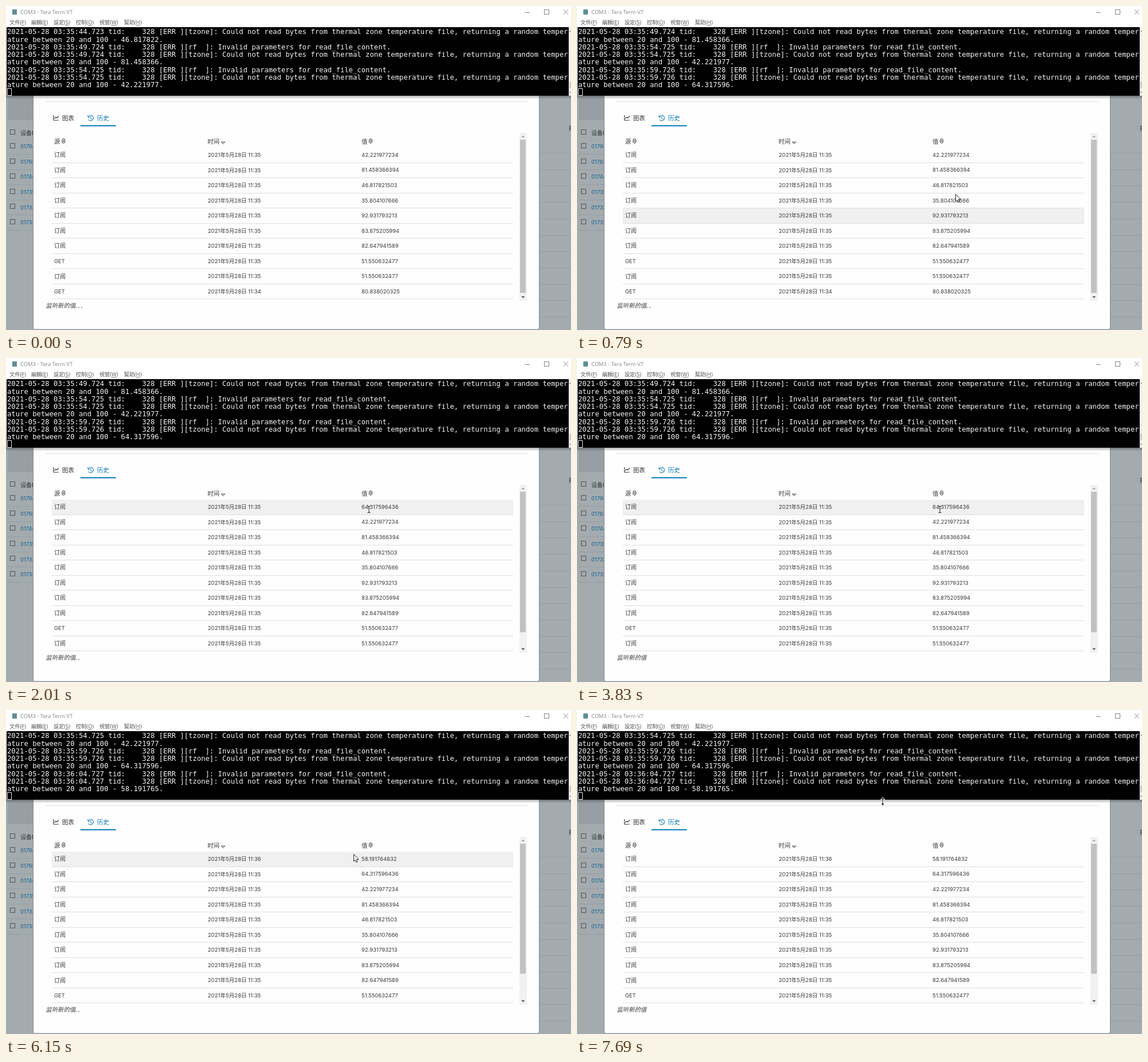
An HTML page with a canvas that plays this animation: 987x567 px, repeating every 7.99 s.

```html
<!DOCTYPE html>
<html lang="zh">
<head>
<meta charset="utf-8">
<title>COM3</title>
<style>
html, body { margin: 0; width: 987px; height: 567px; overflow: hidden; background: #a3abaf; }
canvas { display: block; }
</style>
</head>
<body>
<canvas id="stage" width="987" height="567"></canvas>
<script>
const ctx = document.getElementById('stage').getContext('2d');
const LOOP = 7990;
const UI = 'Inter, "Noto Sans CJK SC", sans-serif';
const MENU = '"Open Sans", "Noto Sans CJK TC", sans-serif';
const MONO = '"DejaVu Sans Mono", monospace';
const BLUE = '#0079b8';
const INK = '#3c3c3c';
const PITCH = 26.55;

const LOG = [
  ['03:35:44.723', '46.817822'], ['03:35:49.724', '81.458366'],
  ['03:35:54.725', '42.221977'], ['03:35:59.726', '64.317596'],
  ['03:36:04.727', '58.191765']
];
const READINGS = [
  '58.191764832', '64.317596436', '42.221977234', '81.458366394', '46.817821503',
  '35.804107666', '92.931793213', '83.875205994', '82.647941589', '51.550632477',
  '51.550632477', '80.838020325'
];
const GET_ROWS = [9, 11];
const DOT_TIMES = [190, 490, 790, 1090, 1410, 1710, 2010, 2310, 2610, 2910, 3210, 3530, 3830,
  4130, 4430, 4730, 5030, 5350, 6150, 6270, 6570, 6870, 7170, 7470, 7690];
// time, x, y, pointer shape
const POINTER = [
  [190, 936, 554, 'arrow'], [390, 905, 505, 'arrow'], [890, 600, 285, 'arrow'],
  [990, 585, 267, 'arrow'], [1710, 620, 262, 'arrow'], [1910, 638, 265, 'beam'],
  [2010, 634, 265, 'beam'], [5350, 634, 265, 'beam'], [5450, 650, 263, 'beam'],
  [6150, 607, 252, 'arrow'], [6870, 534, 151, 'arrow'], [7170, 534, 153, 'arrow'],
  [7270, 534, 157, 'resize'], [7470, 534, 160, 'resize'], [LOOP, 534, 160, 'resize']
];

function rect(x, y, w, h, color) {
  ctx.fillStyle = color;
  ctx.fillRect(x, y, w, h);
}

function text(str, x, centerY, size, color = INK, family = UI, style = '') {
  ctx.font = `${style} ${size}px ${family}`;
  ctx.fillStyle = color;
  ctx.fillText(str, x, centerY + size * 0.36);
}

function path(points, { fill, stroke, width = 1, close = false }) {
  ctx.beginPath();
  points.forEach(([x, y], i) => i ? ctx.lineTo(x, y) : ctx.moveTo(x, y));
  if (close) ctx.closePath();
  if (fill) { ctx.fillStyle = fill; ctx.fill(); }
  if (stroke) { ctx.strokeStyle = stroke; ctx.lineWidth = width; ctx.stroke(); }
}

function triangle(x, y, half, height, style) {
  path([[x - half, y], [x + half, y], [x, y + height]], { close: true, ...style });
}

function box(x, y, w, h, color) {
  ctx.strokeStyle = color;
  ctx.lineWidth = 1;
  ctx.strokeRect(x + 0.5, y + 0.5, w, h);
}

function pointerAt(t) {
  if (t < POINTER[0][0]) return null;
  const i = POINTER.findIndex(key => key[0] > t) - 1;
  const [t0, x0, y0, shape] = POINTER[i];
  const [t1, x1, y1, next] = POINTER[i + 1];
  const jump = shape !== next;
  const wait = t0 === 5450 || t0 === 2010;
  const u = jump || wait ? 0 : Math.floor((t - t0) / 100) * 100 / (t1 - t0);
  return { x: x0 + (x1 - x0) * u, y: y0 + (y1 - y0) * u, shape };
}

function drawBackdrop() {
  rect(0, 0, 987, 567, '#a3abaf');
  rect(3, 157, 46, 43, '#979fa4');
  text('设备ID', 25, 222, 10, '#303538');
  box(7, 216, 8, 8, '#4d5356');
  ['01794', '01762', '01744', '01735', '01733', '01732'].forEach((id, i) => {
    const y = 245 + i * PITCH;
    box(7, Math.round(y) - 5, 8, 8, '#4d5356');
    text(id, 25, y + 1, 9.3, '#14618f');
    rect(3, Math.round(y + 14), 46, 1, '#959da1');
  });
  for (let i = 0; i < 11; i++) rect(931, Math.round(257 + i * 28.7), 56, 1, '#959da1');
  text('报', 983, 214, 10, '#303538');
}

function drawDialog() {
  ctx.beginPath();
  ctx.roundRect(47.5, 100, 884, 466, 3);
  ctx.fillStyle = '#fefefe';
  ctx.fill();
  ctx.strokeStyle = '#80888c';
  ctx.lineWidth = 1;
  ctx.stroke();
  rect(69, 167, 841, 1, '#dddddd');

  path([[83, 191], [83, 200], [92, 200]], { stroke: INK, width: 1.2 });
  path([[84.5, 197], [87, 194.5], [89, 196], [92, 192.5]], { stroke: INK, width: 1.2 });
  text('图表', 98, 196, 10.6);

  ctx.beginPath();
  ctx.arc(148, 196, 4.6, -2.7, 2.5);
  ctx.strokeStyle = BLUE;
  ctx.lineWidth = 1.1;
  ctx.stroke();
  path([[142.5, 191.5], [143.5, 195], [146.5, 194]], { stroke: BLUE });
  path([[148, 193], [148, 196.5], [150.5, 197.8]], { stroke: BLUE });
  text('历史', 159, 196, 10.6, BLUE);
  rect(130, 208.5, 62, 2, BLUE);
}

function sortIcon(x) {
  triangle(x, 235, 3.2, -3.5, { stroke: INK });
  triangle(x, 237.3, 3.2, 3.5, { stroke: INK });
}

function drawTable(step, t, pointer) {
  text('源', 84, 237, 10.4);
  sortIcon(100.5);
  text('时间', 352, 237, 10.4);
  triangle(379.3, 238, 3.2, 3.4, { stroke: INK });
  text('值', 621, 237, 10.4);
  sortIcon(637);

  const hover = pointerAt(t - 100);
  const inTable = pointer && hover && hover.x > 80 && hover.x < 886;
  const hoverRow = inTable ? Math.floor((hover.y - 247.5) / PITCH) : -1;
  for (let row = 0; row < 10; row++) {
    const y = 260.5 + row * PITCH;
    const n = row + 2 - step;
    const minute = n === 0 ? 36 : n === 11 ? 34 : 35;
    if (row === hoverRow) rect(80, Math.round(y - 13), 806, 27, '#f0f0f0');
    rect(80, Math.round(y + 13), 806, 1, '#dedede');
    if (GET_ROWS.includes(n)) text('GET', 84, y, 9.5);
    else text('订阅', 84, y, 10.1);
    text(`2021年5月28日 11:${minute}`, 352.5, y, 9.6);
    text(READINGS[n], 621, y, 9.5);
  }

  const overButton = pointer && pointer.x > 897 && pointer.x < 910 && pointer.y > 502 && pointer.y < 516;
  rect(897, 222, 13, 294, '#f1f1f1');
  if (overButton) rect(897, 503, 13, 13, '#d2d2d2');
  rect(898, 234, 10, [268, 246, 227.5][step], '#c1c1c1');
  triangle(903.2, 230, 3, -3.2, { fill: '#a3a3a3' });
  triangle(903.2, 508, 3, 3.2, { fill: '#505050' });
}

function drawStatus(t) {
  text('监听新的值', 69.5, 524, 10.4, INK, UI, 'italic');
  const dots = (3 + DOT_TIMES.filter(time => time <= t).length) % 4;
  for (let i = 0; i < dots; i++) rect(121.5 + i * 5, 526.8, 1.5, 1.3, INK);
}

function drawTerminal(step) {
  const shade = ctx.createLinearGradient(0, 157, 0, 163);
  shade.addColorStop(0, 'rgba(0,0,0,.3)');
  shade.addColorStop(1, 'rgba(0,0,0,0)');
  rect(0, 157, 987, 6, shade);
  rect(0, 0, 987, 157, '#ffffff');
  rect(11, 6, 8, 9, '#5f8f97');
  text('COM3 - Tera Term VT', 25, 10.5, 9.4, '#858585', MENU);

  path([[907, 11.5], [915, 11.5]], { stroke: '#858585' });
  box(940, 6, 8, 8, '#858585');
  path([[974, 6.5], [982, 14.5]], { stroke: '#858585' });
  path([[982, 6.5], [974, 14.5]], { stroke: '#858585' });

  const menu = [['文件', 'F', 6], ['編輯', 'E', 44], ['設定', 'S', 83],
    ['控制', 'O', 122], ['視窗', 'W', 163], ['幫助', 'H', 206]];
  for (const [label, key, x] of menu) {
    const size = 9.3;
    text(`${label}(${key})`, x, 29, size, '#555555', MENU);
    const start = x + ctx.measureText(label + '(').width;
    rect(start, 33.5, ctx.measureText(key).width, 0.8, '#555555');
  }

  rect(1, 37, 982, 120, '#000000');
  const lines = [];
  LOG.slice(step, step + 3).forEach(([time, value], i) => {
    const head = `2021-05-28 ${time} tid:    328 [ERR ]`;
    if (i) lines.push(head + '[rf  ]: Invalid parameters for read_file_content.');
    lines.push(head + '[tzone]: Could not read bytes from thermal zone temperature file, returning a random temper');
    lines.push(`ature between 20 and 100 - ${value}.`);
  });
  lines.forEach((line, i) => text(line, 2, 45 + i * 13.25, 12.24, '#f4f4f4', MONO));
  box(2, 144, 7, 12, '#e8e8e8');

  rect(983, 37, 4, 120, '#f0f0f0');
  rect(984, 132, 3, 12, '#cdcdcd');
  path([[984, 45], [987, 43]], { stroke: '#606060' });
  path([[984, 150], [987, 152]], { stroke: '#606060' });
}

function drawPointer({ x, y, shape }) {
  ctx.save();
  ctx.translate(x, y);
  if (shape === 'arrow') {
    path([[0.5, 0.5], [0.5, 13], [3.3, 10.4], [5.2, 14.6], [7.1, 13.8], [5.3, 9.6], [9, 9.3]],
      { fill: '#ffffff', stroke: '#202020', close: true });
  } else if (shape === 'beam') {
    path([[-2.5, -5.5], [2.5, -5.5]], { stroke: '#202020' });
    path([[0, -5.5], [0, 5.5]], { stroke: '#202020' });
    path([[-2.5, 5.5], [2.5, 5.5]], { stroke: '#202020' });
  } else {
    const half = [[-1, -3.5], [-3.5, -3.5], [0, -7.5], [3.5, -3.5], [1, -3.5]];
    const lower = half.map(([px, py]) => [-px, -py]);
    path([...half, ...lower], { fill: '#202020', stroke: '#ffffff', width: 0.9, close: true });
  }
  ctx.restore();
}

function frame(now) {
  const t = now % LOOP;
  const pointer = pointerAt(t);
  drawBackdrop();
  drawDialog();
  drawTable(t < 990 ? 0 : t < 6150 ? 1 : 2, t, pointer);
  drawStatus(t);
  drawTerminal(t < 190 ? 0 : t < 5350 ? 1 : 2);
  if (pointer) drawPointer(pointer);
  requestAnimationFrame(frame);
}

requestAnimationFrame(frame);
</script>
</body>
</html>
```
